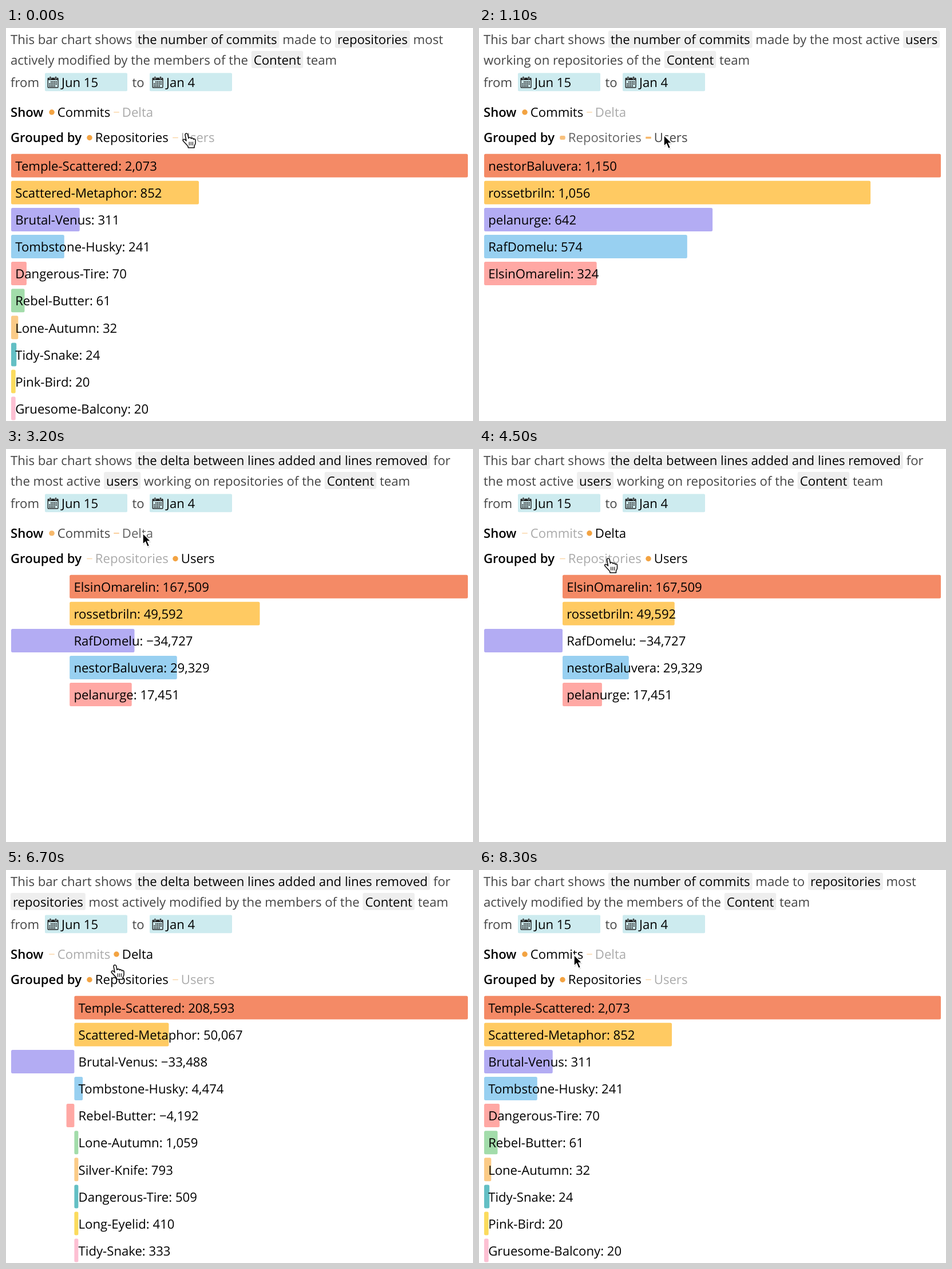
Write an HTML page that moves like this. It is 816 px wide and 686 px high and loops after 8400 ms.

```html
<!DOCTYPE html>
<html lang="en">
<head>
<meta charset="utf-8">
<title>Commit bar chart</title>
<style>
html, body { margin: 0; width: 100%; height: 100%; overflow: hidden; background: #fff; }
svg { position: absolute; left: 0; top: 0; text-rendering: geometricPrecision; }
text { font: 22.13px "Open Sans", sans-serif; white-space: pre; }
</style>
</head>
<body>
<svg id="stage" width="816" height="686" viewBox="0 0 816 686"></svg>
<script>
const LOOP = 8400, LEFT = 9, SPAN = 798, MIN_BAR = 7;
const COLORS = ['#f48a66', '#ffca62', '#b3acf3', '#98d0f1', '#ffa8a4',
  '#a2dcaa', '#fbcb87', '#63bfc4', '#fbdb5d', '#fdc0d3'];

// In the sentences, [words] are highlighted.
const STATES = [
  { show: 0, group: 0,
    lines: ['This bar chart shows [the number of commits] made to [repositories] most',
      'actively modified by the members of the [Content] team'],
    data: { 'Temple-Scattered': 2073, 'Scattered-Metaphor': 852, 'Brutal-Venus': 311,
      'Tombstone-Husky': 241, 'Dangerous-Tire': 70, 'Rebel-Butter': 61, 'Lone-Autumn': 32,
      'Tidy-Snake': 24, 'Pink-Bird': 20, 'Gruesome-Balcony': 20 } },
  { show: 0, group: 1,
    lines: ['This bar chart shows [the number of commits] made by the most active [users]',
      'working on repositories of the [Content] team'],
    data: { nestorBaluvera: 1150, rossetbriln: 1056, pelanurge: 642, RafDomelu: 574,
      ElsinOmarelin: 324 } },
  { show: 1, group: 1,
    lines: ['This bar chart shows [the delta between lines added and lines removed] for',
      'the most active [users] working on repositories of the [Content] team'],
    data: { ElsinOmarelin: 167509, rossetbriln: 49592, RafDomelu: -34727,
      nestorBaluvera: 29329, pelanurge: 17451 } },
  { show: 1, group: 0,
    lines: ['This bar chart shows [the delta between lines added and lines removed] for',
      '[repositories] most actively modified by the members of the [Content] team'],
    data: { 'Temple-Scattered': 208593, 'Scattered-Metaphor': 50067, 'Brutal-Venus': -33488,
      'Tombstone-Husky': 4474, 'Rebel-Butter': -4192, 'Lone-Autumn': 1059, 'Silver-Knife': 793,
      'Dangerous-Tire': 509, 'Long-Eyelid': 410, 'Tidy-Snake': 333 } }
];
const CLICKS = [
  { at: 595, dur: 900, to: 1 },
  { at: 2950, dur: 560, to: 2 },
  { at: 5050, dur: 560, to: 3 },
  { at: 7050, dur: 560, to: 0 }
];
// Pointer moves: start, end, x, y
const MOVES = [
  [100, 400, 323, 187],
  [1950, 2450, 239, 147],
  [4050, 4500, 226.5, 191],
  [6450, 6900, 166, 148]
];
const HANDS = [[0, 595], [2250, 2950], [4300, 5050], [6620, 7050]];

const mix = (a, b, k) => a + (b - a) * k;
const clamp = v => Math.min(1, Math.max(0, v));
const smooth = v => v * v * (3 - 2 * v);
const gray = v => `rgb(${v},${v},${v})`;

// The standard CSS "ease" curve
function ease(x) {
  let lo = 0, hi = 1;
  const at = (s, a, b) => 3 * (1 - s) ** 2 * s * a + 3 * (1 - s) * s * s * b + s ** 3;
  for (let i = 0; i < 24; i++) {
    const m = (lo + hi) / 2;
    if (at(m, .25, .25) < x) lo = m; else hi = m;
  }
  return at(lo, .1, 1);
}

const stage = document.getElementById('stage');
function set(el, attrs) {
  for (const k in attrs) el.setAttribute(k, attrs[k]);
  return el;
}
function add(tag, attrs, parent = stage) {
  return parent.appendChild(set(document.createElementNS('http://www.w3.org/2000/svg', tag), attrs));
}
function write(x, y, words, fill = '#000', parent = stage) {
  const el = add('text', { x, y, fill }, parent);
  el.textContent = words;
  return el;
}

// Sets one sentence line from left to right, with a box behind highlighted words.
function setLine(line, y, parent) {
  const pad = 4;
  let x = 8;
  line.split(/[[\]]/).forEach((words, i) => {
    if (!words) return;
    const marked = i % 2;
    const box = marked && add('rect', { x, y: y - 23.6, height: 30, rx: 3, fill: '#eee' }, parent);
    if (marked) x += pad;
    x += write(x, y, words, marked ? '#000' : '#444', parent).getComputedTextLength();
    if (marked) {
      x += pad;
      set(box, { width: x - box.getAttribute('x') });
    }
  });
}

function layout(state) {
  const values = Object.values(state.data);
  const min = Math.min(0, ...values), scale = SPAN / (Math.max(...values) - min);
  state.zero = LEFT - min * scale;
  state.bars = values.map(v => {
    const w = Math.max(MIN_BAR, Math.abs(v) * scale);
    return v < 0 ? [state.zero - w, state.zero] : [state.zero, state.zero + w];
  });
  state.labels = Object.entries(state.data).map(([name, v]) =>
    `${name}: ${v.toLocaleString('en-US').replace('-', '\u2212')}`);
  state.intro = add('g', {});
  state.lines.forEach((line, i) => setLine(line, 28.3 + i * 35.3, state.intro));
  state.intro.style.display = 'none';
}
STATES.forEach(layout);

function dateBox(x, words) {
  add('rect', { x, y: 78.6, width: 144, height: 31.6, rx: 2, fill: '#cdebef' });
  const g = add('g', { transform: `translate(${x + 4.5} 84.5)`, fill: '#222' });
  add('rect', { x: .7, y: 3, width: 17.8, height: 16.5, rx: 1, fill: 'none', stroke: '#222', 'stroke-width': 1.4 }, g);
  add('rect', { x: 1, y: 3, width: 17, height: 3.5 }, g);
  for (const px of [3.6, 13.2]) {
    add('rect', { x: px, y: 0, width: 2.6, height: 5, rx: 1, stroke: '#cdebef', 'stroke-width': .7 }, g);
  }
  for (let i = 1; i < 14; i++) {
    add('rect', { x: 2.7 + i % 5 * 2.9, y: 8.6 + Math.floor(i / 5) * 3.5, width: 2, height: 2.2 }, g);
  }
  write(x + 29, 103, words);
}

write(8, 103, 'from', '#444');
dateBox(68, 'Jun 15');
write(220.5, 103, 'to', '#444');
dateBox(251, 'Jan 4');
write(8, 154.5, 'Show').style.fontWeight = 600;
write(8, 199, 'Grouped by').style.fontWeight = 600;

const options = [
  ['show', 0, 80, 154.5, 'Commits'], ['show', 1, 193, 154.5, 'Delta'],
  ['group', 0, 146, 199, 'Repositories'], ['group', 1, 296, 199, 'Users']
].map(([key, value, x, y, words]) => ({
  key, value, y: y - 7.5, mark: add('rect', { x: x - 4.75, width: 9.5 }), text: write(x + 9.8, y, words)
}));

const rows = COLORS.map((fill, i) => {
  const y = 219.7 + i * 47.1, g = add('g', {});
  return {
    g,
    bar: add('rect', { y, height: 41, rx: 2.5, fill }, g),
    text: write(0, y + 29.2, '', '#000', g)
  };
});

const hand = add('g', { stroke: '#111', 'stroke-width': 1.6, 'stroke-linejoin': 'round', 'stroke-linecap': 'round' });
add('path', { fill: '#fff', d: 'M-3 2.5C-3-.8 1-.8 1.7 2L3 8.5C3.5 6.5 7 6.5 7.5 9C8.5 7.5 11 8 11.5 10.3' +
  'C12.5 9 15 9.7 15 12V17C15 19 13.3 20.5 13 22V25H2.5L2 22.5C0 20-3 17-6 13.8C-8 11-5.5 9.3-3 11L-1 13Z' }, hand);
add('path', { fill: 'none', 'stroke-width': 1.2, d: 'M4.2 15V20.5M7.3 15V20.5M10.4 15V20.5' }, hand);
const arrow = add('g', {});
const arrowPath = 'M0 0V19.5L4.5 15.3L8 23.5L11.6 22L8.2 14H14Z';
add('path', { d: arrowPath, opacity: .15, transform: 'translate(.8 2)' }, arrow);
add('path', { d: arrowPath, stroke: '#fff', 'stroke-width': 1.5 }, arrow);

let shown = null;
function swap(state) {
  if (shown === state) return;
  shown = state;
  for (const s of STATES) s.intro.style.display = s === state ? '' : 'none';
  rows.forEach((row, i) => {
    row.g.style.display = i < state.bars.length ? '' : 'none';
    row.text.textContent = state.labels[i] || '';
  });
}

function draw(t) {
  let from = STATES[0], to = from, k = 1;
  for (const c of CLICKS) {
    if (t < c.at) break;
    from = to;
    to = STATES[c.to];
    k = clamp((t - c.at) / c.dur);
  }
  swap(to);

  const p = ease(k), zero = mix(from.zero, to.zero, p);
  to.bars.forEach(([a, b], i) => {
    const [a0, b0] = from.bars[i] || [from.zero, from.zero + MIN_BAR];
    const x = mix(a0, a, p);
    set(rows[i].bar, { x, width: mix(b0, b, p) - x });
    set(rows[i].text, { x: zero + 7.2 });
  });

  const tint = smooth(k), morph = clamp((k - .43) / .47);
  for (const o of options) {
    const was = +(from[o.key] === o.value), is = +(to[o.key] === o.value);
    const on = mix(was, is, morph), lit = mix(was, is, tint), h = mix(1.4, 9.5, on);
    set(o.mark, {
      y: o.y - h / 2, height: h, rx: 4.75 * on * on,
      fill: `rgb(${mix(251, 243, lit)},${mix(212, 163, lit)},${mix(164, 66, lit)})`
    });
    set(o.text, { fill: gray(Math.round(mix(170, 0, lit))) });
  }

  let x = 316, y = 184;
  for (const [a, b, mx, my] of MOVES) {
    const m = smooth(clamp((t - a) / (b - a)));
    x = mix(x, mx, m);
    y = mix(y, my, m);
  }
  const pointing = HANDS.some(([a, b]) => t >= a && t < b);
  hand.style.display = pointing ? '' : 'none';
  arrow.style.display = pointing ? 'none' : '';
  set(pointing ? hand : arrow, { transform: `translate(${x} ${y})` });
}

const start = performance.now();
function tick() {
  draw((performance.now() - start) % LOOP);
  requestAnimationFrame(tick);
}
tick();
</script>
</body>
</html>
```
